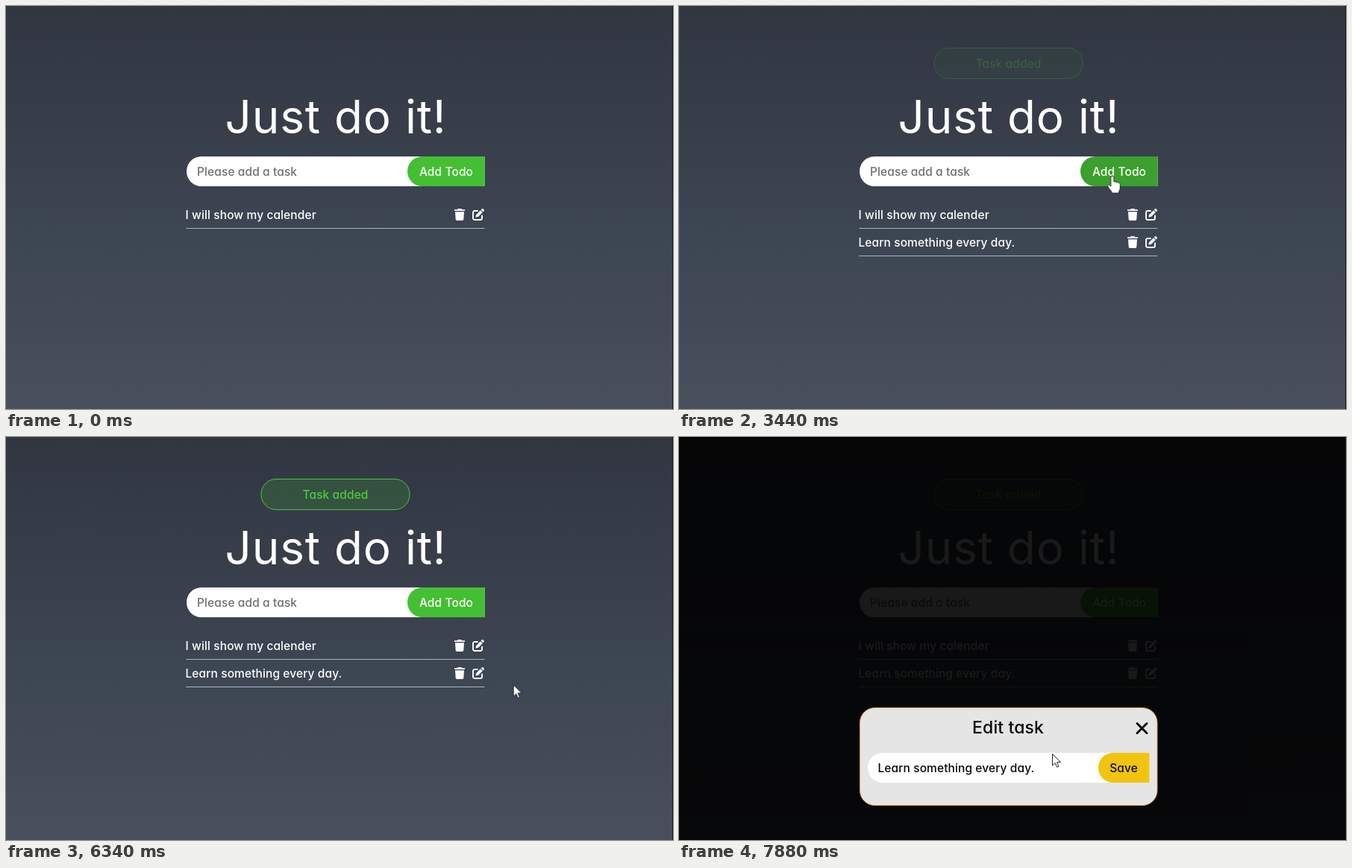
Recreate the animation shown at these times as an HTML page. Size 894x541 px, loop 8000 ms.

```html
<!DOCTYPE html>
<html lang="en">
<head>
<meta charset="utf-8">
<title>Todo list</title>
<style>
  html, body { margin: 0; width: 100%; height: 100%; overflow: hidden; background: #3d4654; }
  svg { position: absolute; left: 0; top: 0; }
  svg, #typed { font: 500 15.5px Inter, Lato, sans-serif; letter-spacing: .1px; font-feature-settings: "cv11"; }
  text { fill: #fff; white-space: pre; }
  .middle { text-anchor: middle; }
  .title { font-size: 62px; font-weight: 400; letter-spacing: .8px; }
  .heading { font-size: 23px; }
  .dark { fill: #08080c; }
  .rule { stroke: #fff; stroke-opacity: .6; }
  .icon { color: #fff; }
  #hint { fill: #707070; }
  #typed { position: absolute; left: 256px; top: 202px; line-height: 40px; white-space: pre; color: #111; }
  #typed span { text-decoration: underline wavy #d33 1px; text-underline-offset: 1px; text-decoration-skip-ink: none; }
  #typed i { display: inline-block; width: 1px; height: 20px; background: #000; vertical-align: -5px; }

  .anim { animation: 8s linear infinite; }
  .step { animation: 8s step-end infinite; }
  #cursor { animation-name: travel; }
  #arrow { animation-name: arrow; }
  #hand { animation-name: hand; }
  #beam { animation-name: beam; }
  #add { animation-name: add; }
  #warn { animation-name: warn; }
  #done { animation-name: done; }
  #second { animation-name: second; }
  #bin { animation-name: bin; }
  #pen { animation-name: pen; }
  #modal { animation-name: modal; }

  @keyframes travel {
    0%, 2% { transform: translate(600px, 560px); animation-timing-function: ease-out; }
    10% { transform: translate(572px, 222px); }
    14%, 17.5% { transform: translate(569px, 212px); animation-timing-function: ease-in-out; }
    21%, 34.5% { transform: translate(486px, 222px); animation-timing-function: ease-in-out; }
    40% { transform: translate(580px, 226px); }
    52%, 58.6% { transform: translate(583px, 234px); animation-timing-function: ease-in; }
    65% { transform: translate(910px, 420px); }
    73.5% { transform: translate(910px, 345px); animation-timing-function: ease-out; }
    82% { transform: translate(640px, 330px); }
    85%, 87.4% { transform: translate(608px, 318px); }
    89.1%, 92.5% { transform: translate(630px, 319px); animation-timing-function: ease-in-out; }
    97%, 100% { transform: translate(500px, 425px); }
  }
  @keyframes arrow {
    0% { opacity: 0; }
    2% { opacity: 1; }
    8.2% { opacity: 0; }
    59.5% { opacity: 1; }
    65% { opacity: 0; }
    73.5% { opacity: 1; }
    83.5% { opacity: 0; }
    93.4%, 100% { opacity: 1; }
  }
  @keyframes hand {
    0% { opacity: 0; }
    8.2% { opacity: 1; }
    18.7% { opacity: 0; }
    37.8% { opacity: 1; }
    59.5% { opacity: 0; }
    83.5% { opacity: 1; }
    93.4%, 100% { opacity: 0; }
  }
  @keyframes beam {
    0% { opacity: 0; }
    18.7% { opacity: 1; }
    22.9% { opacity: 0; }
    35% { opacity: 1; }
    37.8%, 100% { opacity: 0; }
  }
  @keyframes add {
    0% { fill: #44bf33; }
    8.2% { fill: #3ba02d; }
    18.7% { fill: #44bf33; }
    37.8% { fill: #3ba02d; }
    59.5%, 100% { fill: #44bf33; }
  }
  @keyframes warn {
    0%, 15% { opacity: 0; }
    18.2%, 42.24% { opacity: 1; }
    42.25%, 100% { opacity: 0; }
  }
  @keyframes done {
    0%, 42.25% { opacity: 0; }
    45.5%, 100% { opacity: 1; }
  }
  @keyframes second {
    0% { opacity: 0; }
    42.25%, 100% { opacity: 1; }
  }
  @keyframes bin {
    0% { color: #fff; }
    84.5% { color: #e04a4a; }
    88.5%, 100% { color: #fff; }
  }
  @keyframes pen {
    0% { color: #fff; }
    88.5% { color: #f0a01e; }
    93.4%, 100% { color: #fff; }
  }
  @keyframes modal {
    0%, 91.1% { opacity: 0; }
    95.6%, 100% { opacity: 1; }
  }
</style>
</head>
<body>
<svg width="894" height="541" viewBox="0 0 894 541">
  <defs>
    <linearGradient id="sky" x2="0" y2="1">
      <stop offset="0" stop-color="#313641"/>
      <stop offset=".58" stop-color="#3d4653"/>
      <stop offset="1" stop-color="#4a4f5c"/>
    </linearGradient>
    <path id="trash" fill="currentColor" d="M0 1.2h4L4.6 0h4.8l.6 1.2h4v1.9H0zM1 4.2h12l-.7 10.4a1.5 1.5 0 0 1-1.5 1.4H3.2a1.5 1.5 0 0 1-1.5-1.4z"/>
    <g id="edit">
      <path fill="none" stroke="currentColor" stroke-width="1.9" stroke-linecap="round" d="M7 3H3.2A2.2 2.2 0 0 0 1 5.2v7.6A2.2 2.2 0 0 0 3.2 15h7.6a2.2 2.2 0 0 0 2.2-2.2V9.5"/>
      <path fill="currentColor" d="M5 8.2l6-6L13.8 5l-6 6-3.4.6zM11.7 1.5l.9-.9a1.6 1.6 0 0 1 2.2 0l.6.6a1.6 1.6 0 0 1 0 2.2l-.9.9z"/>
    </g>
  </defs>

  <rect width="894" height="541" fill="url(#sky)"/>

  <g id="warn" class="anim">
    <rect x="342" y="56.5" width="199" height="41" rx="20" fill="#e04a4a" fill-opacity=".15" stroke="#d94848"/>
    <text class="middle" x="441.5" y="83" style="fill:#de4a4a">Please give a task</text>
  </g>
  <g id="done" class="anim">
    <rect x="342" y="56.5" width="199" height="41" rx="20" fill="#3fb52e" fill-opacity=".2" stroke="#4cc53a"/>
    <text class="middle" x="441.5" y="83" style="fill:#50cb3e">Task added</text>
  </g>

  <text class="title middle" x="442" y="171">Just do it!</text>

  <path fill="#fff" d="M641.500 202H262a20 20 0 0 0 0 40H641.500z"/>
  <path id="add" class="step" d="M641.500 202H558a20 20 0 0 0 0 40H641.500z"/>
  <text id="hint" x="256" y="228">Please add a task</text>
  <text class="middle" x="590" y="228">Add Todo</text>

  <g>
    <text x="240.500" y="286">I will show my calender</text>
    <use class="icon" href="#trash" x="601" y="272"/>
    <use class="icon" href="#edit" x="625" y="272"/>
    <path class="rule" d="M241.500 298.500H641.500"/>
  </g>
  <g id="second" class="step">
    <text x="240.500" y="323">Learn something every day.</text>
    <use id="bin" class="icon step" href="#trash" x="601" y="309"/>
    <use id="pen" class="icon step" href="#edit" x="625" y="309"/>
    <path class="rule" d="M241.500 335.500H641.500"/>
  </g>

  <g id="modal" class="anim">
    <rect width="894" height="541" fill-opacity=".9"/>
    <rect x="242.500" y="363.500" width="398.500" height="131" rx="20" fill="#e5e5e5" stroke="#e0a040"/>
    <text class="heading middle dark" x="441" y="398">Edit task</text>
    <path d="M614 384.500l13 13m0-13l-13 13" stroke="#08080c" stroke-width="3" stroke-linecap="round"/>
    <path fill="#fff" d="M630.500 424H273a20 20 0 0 0 0 40H630.500z"/>
    <path fill="#f1c410" d="M630.500 424H582a20 20 0 0 0 0 40H630.500z"/>
    <text class="dark" x="266.500" y="450">Learn something every day.</text>
    <text class="middle" x="596" y="450" style="fill:#0b0b30">Save</text>
  </g>

  <path d="M893.500 0V541" stroke="#15171c"/>
</svg>

<div id="typed"></div>

<svg width="894" height="541" viewBox="0 0 894 541">
  <g id="cursor" class="anim">
    <path id="arrow" class="step" fill="#fff" stroke="#222" d="M.5.500v15.500l3.600-3.400 2.500 5.600 2.400-1-2.500-5.500h5z"/>
    <path id="hand" class="step" fill="#fff" stroke="#222" stroke-width=".9" stroke-linejoin="round" d="M-2 2a2 2 0 0 1 4 0v6c1-1 3-.5 3 .8 1-1 3-.5 3 .8 1-.6 2.500 0 2.500 1.500v5c0 3-2 4-2 7h-9c0-3-4-5-5.500-9-.8-2 1.500-3.200 3-1.200l1 1.200z"/>
    <path id="beam" class="step" fill="none" stroke="#222" d="M-3-8.500h2.500l.5.500.5-.5H3M0-8V8M-3 8.500h2.500L0 8l.5.500H3"/>
  </g>
</svg>

<script>
  const sentence = 'Learn something every day.';
  const focusAt = 1700, typeFrom = 1830, typeTo = 2650, submitAt = 3380;
  const typed = document.getElementById('typed');
  const hint = document.getElementById('hint');
  const clock = document.getElementById('cursor').getAnimations()[0];
  let shown = null;

  function field(time) {
    if (time < focusAt || time >= submitAt) return '';
    const progress = Math.min(1, Math.max(0, (time - typeFrom) / (typeTo - typeFrom)));
    const text = sentence.slice(0, Math.floor(progress * sentence.length));
    return text.replace(/\S+/g, '<span>$&</span>') + '<i></i>';
  }

  function draw() {
    const markup = field((clock.currentTime || 0) % 8000);
    if (markup !== shown) {
      typed.innerHTML = shown = markup;
      hint.style.visibility = markup.includes('span') ? 'hidden' : 'visible';
    }
    requestAnimationFrame(draw);
  }
  draw();
</script>
</body>
</html>
```
